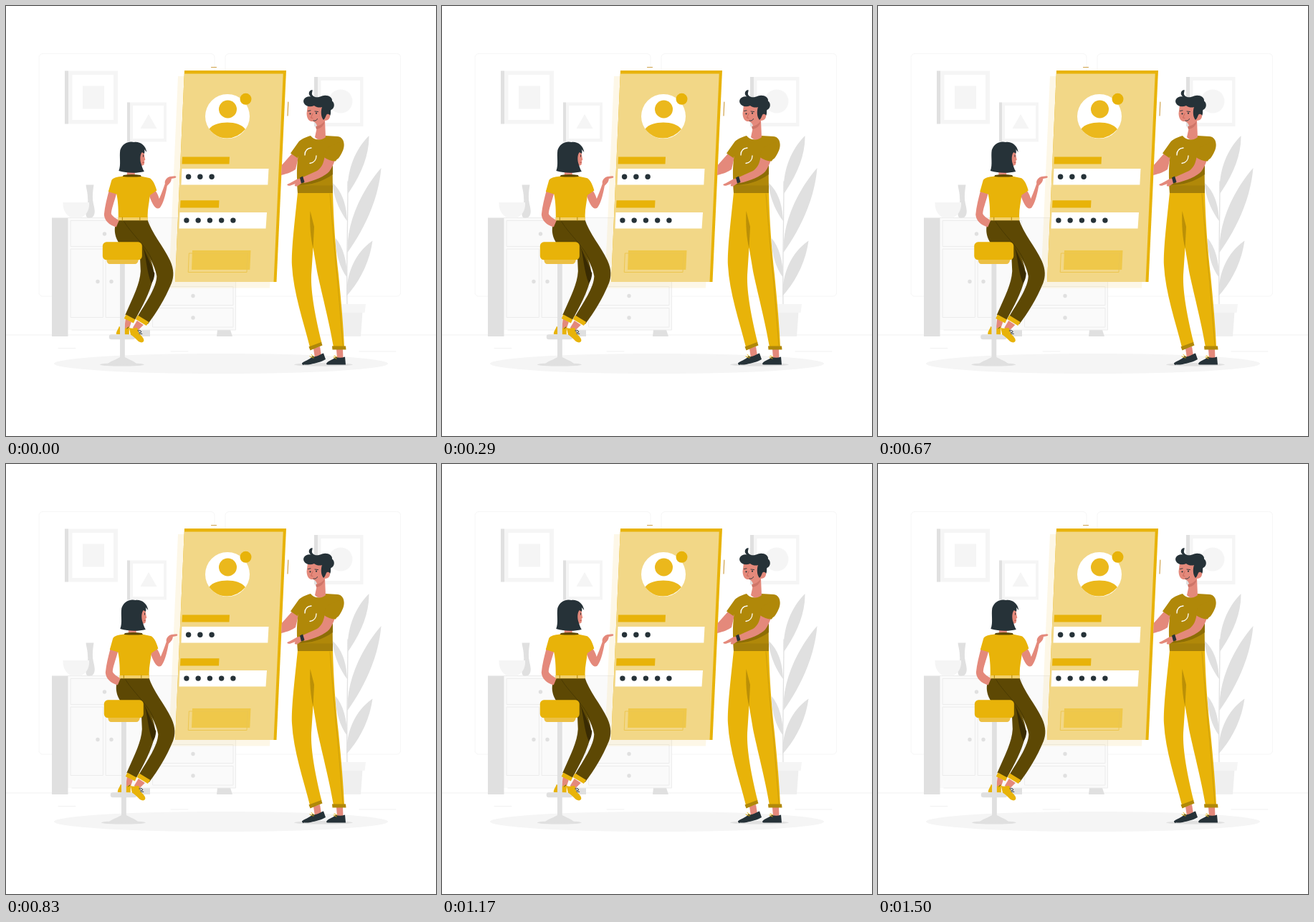
Write an HTML page that moves like this. It is 600 by 600 pixels and loops after 1.54 s.

```html
<!DOCTYPE html>
<html lang="en">
<head>
<meta charset="utf-8">
<title>Login screen</title>
<style>
  html, body { margin: 0; width: 100%; height: 100%; overflow: hidden; background: #fff; }
  svg { display: block; width: 100%; height: 100%; }
  .gold { fill: #e8b309; }
  .olive { fill: #b08809; }
  .brown { fill: #5d4804; }
  .ink { fill: #263238; }
  .skin { fill: #e4897b; }
  .g1 { fill: #f5f5f5; }
  .g2 { fill: #e0e0e0; }
  .white { fill: #fff; }
  .line { fill: none; stroke-linecap: round; stroke-linejoin: round; }
</style>
</head>
<body>
<svg viewBox="0 0 600 600">
  <!-- room -->
  <g class="line" stroke="#f6f6f6">
    <rect x="46" y="66.500" width="245" height="338.500" rx="5"/>
    <rect x="306" y="66.500" width="244.500" height="338.500" rx="5"/>
    <path stroke="#f1f1f1" d="M0 459H600M73 477.500H97M230 482H254M493 482H544"/>
  </g>
  <g>
    <path class="g1" d="M82 90.500H156V164.500H82Z"/>
    <path class="g2" d="M82 90.500H87V164.500H82Z"/>
    <path class="white" d="M92.500 96H150V159H92.500Z"/>
    <path class="g1" d="M107 111.500H137V143.500H107Z"/>
    <path class="g1" d="M169 134.500H224V189.500H169Z"/>
    <path class="g2" d="M169 134.500H173V189.500H169Z"/>
    <path class="white" d="M177 139H220V185H177Z"/>
    <path class="g1" d="M199 151L210.500 171H187.500Z"/>
    <path class="g1" d="M430 99H498.500V168H430Z"/>
    <path class="g2" d="M430 99H435V168H430Z"/>
    <path class="white" d="M439.500 104H494V163H439.500Z"/>
    <circle class="g1" cx="467" cy="133" r="16.500"/>
  </g>

  <!-- cabinet -->
  <path fill="#fafafa" d="M86 295.500H320.500V452H86Z"/>
  <path class="g2" d="M64 295.500H86.500V461H64ZM180 452H201V461H178ZM295 452H313L316 461H294Z"/>
  <g class="line" stroke="#ececec">
    <path d="M86 295.500H320.500V452H92"/>
    <rect x="90.500" y="299.500" width="110" height="36"/>
    <rect x="90.500" y="339" width="45" height="95.500"/>
    <rect x="139.500" y="339" width="61" height="95.500"/>
    <rect x="205" y="391.500" width="112" height="26"/>
    <rect x="205" y="421.500" width="112" height="26.500"/>
  </g>
  <g class="g2">
    <circle cx="137.500" cy="318" r="2.700"/>
    <circle cx="128" cy="384.500" r="2.700"/>
    <circle cx="147" cy="384.500" r="2.700"/>
    <circle cx="261" cy="404.500" r="2.700"/>
    <circle cx="261" cy="435" r="2.700"/>
    <path d="M111.500 249.500H122.500C121 259 120 268 122 276C124 284 125 290 121 294.500Q119 296 114 295.500Q111 294 111.500 290C113 282 115 275 114 267C114 260 112 255 111.500 249.500Z"/>
  </g>
  <path class="g1" d="M79.500 274H116C117 285 111 293 104 295.500H91C84 292 79 285 79.500 274Z"/>

  <!-- plant -->
  <path class="line" stroke="#e0e0e0" stroke-width="1.300" d="M476 417C475 360 477 300 477 245"/>
  <path class="g2" d="M477 262C475 234 485 202 506.500 181C507 210 494 238 477 262ZM476.500 344C475 304 494 260 523.500 226C520 270 499 313 476.500 344ZM475 405C475 371 488 344 511.500 327.500C507 360 492 386 475 405ZM476 300C466 287 456 265 456 247C468 258 475 275 476 300ZM476 379C465 365 459 341 460 324C470 336 476 355 476 379Z"/>
  <path fill="#efefef" d="M467 427H497.500L495 461H470Z"/>
  <path class="g1" d="M464 416H502L500.500 428H465Z"/>

  <ellipse class="g1" cx="300" cy="499" rx="233" ry="14"/>

  <!-- phone -->
  <path fill="#f2d787" opacity=".2" d="M240 98H384L368 393.500H227Z"/>
  <path class="gold" d="M249 90H391L377.500 385H236Z"/>
  <path fill="#f2d787" d="M248.800 94.500H386.700L373.500 385H236Z"/>
  <path class="line" stroke="#cfa24a" stroke-width="1.200" d="M286.500 85.500H293.500M393.800 134L393 153"/>
  <circle class="white" cx="309" cy="154" r="31"/>
  <circle fill="#ebb81c" cx="309.500" cy="144" r="12.500"/>
  <path fill="#ebb81c" d="M283.500 171.500C292 160 325 159 334 172Q323 184.500 308.500 184.500Q293 184.500 283.500 171.500Z"/>
  <circle class="gold" cx="334.500" cy="129.800" r="8"/>
  <path class="gold" d="M246 210.500H312L311.500 220.500H245.500ZM243.500 271.200H297.500L297 281.500H243Z"/>
  <path class="white" d="M245.500 227H366.500L365.300 249.500H244.500ZM242.500 288H364L362.500 310.500H241.500Z"/>
  <g id="dots" class="ink"></g>
  <path fill="#efc84a" d="M260 341H341.500L340.300 368H259Z"/>
  <path class="line" stroke="#ecc650" d="M255.700 345H337L336 371.500H254.600Z"/>

  <!-- man -->
  <ellipse class="g2" cx="443" cy="500.300" rx="41" ry="2.300"/>
  <path class="skin" d="M429 478L438 475L440 488L431 491ZM461 479H470L470.500 492H462ZM399 206L384.800 222L384 236C393 234 400 231 404 228L408 211Z"/>
  <path class="ink" d="M413 498.500C415 495.500 424 494 427.500 488.500C433 491 438 486 443 484.500L446 493C440 497 432 498 425 500C419 501 412 501 413 498.500ZM447 499C449 494.500 457 494 460 489.500Q466 492 473 489.500L474 500.500H449Q447 500.500 447 499Z"/>
  <path class="line" stroke="#e8b309" d="M424 489L429 491M426 486.500L430 489.500M457 490L461 492M458 488L462 490"/>
  <path class="gold" d="M407 260H456C457 300 460 340 464 375C468 415 471 450 472 476H457C451 440 439 395 434 370L428.500 337L426 375C425 400 432 435 440.500 470L424 476C415 440 401 400 399 362C398 340 403 300 407 260Z"/>
  <path fill="#bb9007" d="M424.500 286C423.500 305 425 325 428.500 338L430 308Z"/>
  <path class="line" stroke="#c99b08" stroke-width=".8" d="M452 262C455 300 459 350 463 388L470 474"/>
  <path class="olive" d="M422.500 475.500L440 469L441.500 473.500L424.500 480.500ZM455 474.500H474L474.500 479.500H455.500Z"/>
  <path class="olive" d="M425 181C418 183 411 186 408 190L397 205.500L406.500 212L407.500 210C405 230 406 242 407 261H456L455.500 214C463 217 466 210 469 204C474 195 472 183 463 182L446 181C441 188 430 188 425 181Z"/>
  <path fill="#8d6d05" d="M456 222V235C442 245 425 250 407 250V245L420 240Z"/>
  <path fill="#a47f09" d="M406.500 250.500H456V261H407Z"/>
  <path class="skin" d="M444.500 211C443 220 440 226 434 230L414 239L416 247C430 244 446 237 451 231C455 226 457 220 459 215ZM411 240.500C405 241 400 246 393 248.500C391 250 394 251.300 397 250.500L404 248C401 251 404 252.500 407 251L413 247Z"/>
  <path class="ink" d="M410 239.500L414 237.500L416.500 245.500L412 247.500Z"/>
  <path class="olive" d="M447 198L443 210.500Q451 216.500 460 216.500L469 203L465 190Z"/>
  <path class="line" stroke="#fff" stroke-width="1.300" d="M417 208C417 202 420 198.500 426 198M433 209C433 214 430 218.500 424 219.500"/>
  <path class="skin" d="M421 138L419.500 150C420 158 423 161.500 428 161C432 162 434 165 434 169L431 183C435 188 441 187 446 183L445 160C450 160 453 156 452 151L447 138Z"/>
  <path fill="#ce7568" d="M432 168C437 168 442 164 444.500 161C444 167 439 171 433 172Z"/>
  <path class="ink" d="M427.500 117C421.500 118 421.500 124 425.500 126.500C418 125 413 131 416 136C418 140 424 141.500 430 139C434 142 438 142 441 141C439 147 439.500 155 443 159C446 157 446 152 448 151C450 150 452 152 452 153C454 150 452.500 147 453.500 145C459 143 459 135 455 132.500C456 127 448 123 441 125.500C436 128 431 128 428 125C425.500 122 428 120 427.500 117Z"/>
  <g class="ink">
    <circle cx="424.500" cy="150.300" r="1.100"/>
    <circle cx="433" cy="149.700" r="1.100"/>
  </g>
  <path class="line" stroke="#263238" stroke-width=".9" d="M421.500 146.500L425 145.800M431 147L435.500 147.500M429 160Q433 161 434.500 157.500"/>
  <path class="line" stroke="#c76557" stroke-width=".9" d="M428 150L425.500 156L428 156.500"/>

  <!-- woman on the stool -->
  <g id="sitter">
    <ellipse class="g2" cx="162" cy="500.300" rx="31" ry="2.300"/>
    <path class="skin" d="M167 436L175 441L171 453H165ZM183 439L192 445L183 454L177 449Z"/>
    <path class="gold" d="M154 458C154 453 157 451 158 447Q162 450 166 450L172 447V459Z"/>
    <path class="g2" d="M159.200 359H166V490C171 493 178 495 183 499.500Q162 502 141.500 499.500C147 495 155 493 159.200 490Z"/>
    <rect class="g2" x="144" y="458.300" width="36.500" height="7" rx="3"/>
    <path class="gold" d="M172 449C176 451 180 448.500 183 449C185 452 184 454 186 457C189 460 193 464 192.500 467C192 470 188 470 185 468C181 464 178 461 174 458.500Z"/>
    <path class="line" stroke="#263238" stroke-width=".9" d="M184 453Q188 451 189 455Q186 457 185 454M186 457L190 457.500M169 450L171 448"/>
    <path class="brown" d="M186 325C196 340 209 362 206 379C201 400 190 420 180 438L166.500 431C178 405 187 388 188 370Z"/>
    <path fill="#392b02" d="M191 335C196 350 196 370 203 387Q207 382 207.500 373Z"/>
    <path class="brown" d="M157 298H197.500C203 316 220 336 229 355C235 368 234.500 378 231 387C222 409 210 428 198 444L183 434.500C196 413 210 393 210.500 377C208 360 196 345 190 333H160C151 324 149 306 157 298Z"/>
    <path class="line" stroke="#463603" stroke-width=".8" d="M165 301C176 319 195 334 204 354"/>
    <path class="gold" d="M167.500 430.500L180.500 437.500L178 442.500L165 436ZM184 431.500L199.500 441L196 446L181 437Z"/>
    <rect class="gold" x="135" y="329.300" width="55" height="25" rx="5.500"/>
    <path fill="#ecc044" d="M140.500 354H185Q184 360 180 360H145Q141 360 140.500 354Z"/>

    <path class="skin" d="M144 257L154.500 261C151 274 147 284 147 290C149 294 154 297 158 299L154 308.500C144 306 137.500 299 137 291C138 280 141 268 144 257Z"/>
    <path class="skin" d="M199 262L208 257C212 262 213 266 214 269C217 262 220 254 222 248C221 243 225 239 229 238L236 237.300C238 237.500 238 239.500 236 240L231 241C231 245 228 248 225 251C223 262 220 275 215 281.500C209 286 204 276 199 262Z"/>
    <path class="skin" d="M169 229H180V238H169Z"/>
    <path class="gold" d="M163 237.500C155 238.500 150 239.500 147.500 243L143 259L154.500 262.500C157 275 157 286 157 297H198C197 285 200 275 201 264L210.500 257.500C208 248 204 241 200 240L188 237.500Z"/>
    <path class="brown" d="M164 236Q176 234 188 236L189 238Q176 239 163 238Z"/>
    <path fill="#f2cf69" d="M156.500 295H198V299.300H156.500Z"/>
    <path class="line" stroke="#b08809" d="M162.500 295V299M187 295V299"/>
    <path class="skin" d="M185 202H192C193.500 206 193 210 194.500 214.500L193 216V221C191 223.500 187 223 184 222Z"/>
    <path class="ink" d="M157.500 230C161 222 158 210 159.500 201C163 191 172 188 179 190C187 189 195 194 196.500 204L193 200C194 203 193.500 205 193 206L190 204C187.500 207 187 212 188 218C190 224 191 228 193 231C181 234 168 233 157.500 230Z"/>
    <path class="line" stroke="#263238" stroke-width=".9" d="M191.700 208V210.300"/>
    <path class="line" stroke="#b94f45" stroke-width=".9" d="M191 218.500L193 218"/>
  </g>
</svg>
<script>
  const LOOP = 1540, CYCLE = 1500, LEAD = 20, STEP = 1000 / 24, SCALE = 1.2;
  // Shake offsets at every tenth of the cycle
  const shake = [0, -1, 2, -4, 4, -4, 4, -4, 2, -1, 0];
  const sitter = document.getElementById('sitter');

  const dotRow = (x, y, n) => Array.from({ length: n }, (_, i) =>
    `<circle cx="${x + i * 16.25}" cy="${y}" r="3.7"/>`).join('');
  document.getElementById('dots').innerHTML = dotRow(254.6, 238.2, 3) + dotRow(251.9, 299.1, 5);

  function offset(time) {
    const p = (time % CYCLE) / CYCLE * 10;
    const i = Math.floor(p);
    return SCALE * (shake[i] + (shake[i + 1] - shake[i]) * (p - i));
  }

  function draw() {
    const t = performance.now() % LOOP;
    const step = Math.min(36, Math.floor((t + 4.9) / STEP));
    sitter.setAttribute('transform', `translate(${offset(step * STEP + LEAD).toFixed(3)} 0)`);
    requestAnimationFrame(draw);
  }
  draw();
</script>
</body>
</html>
```
